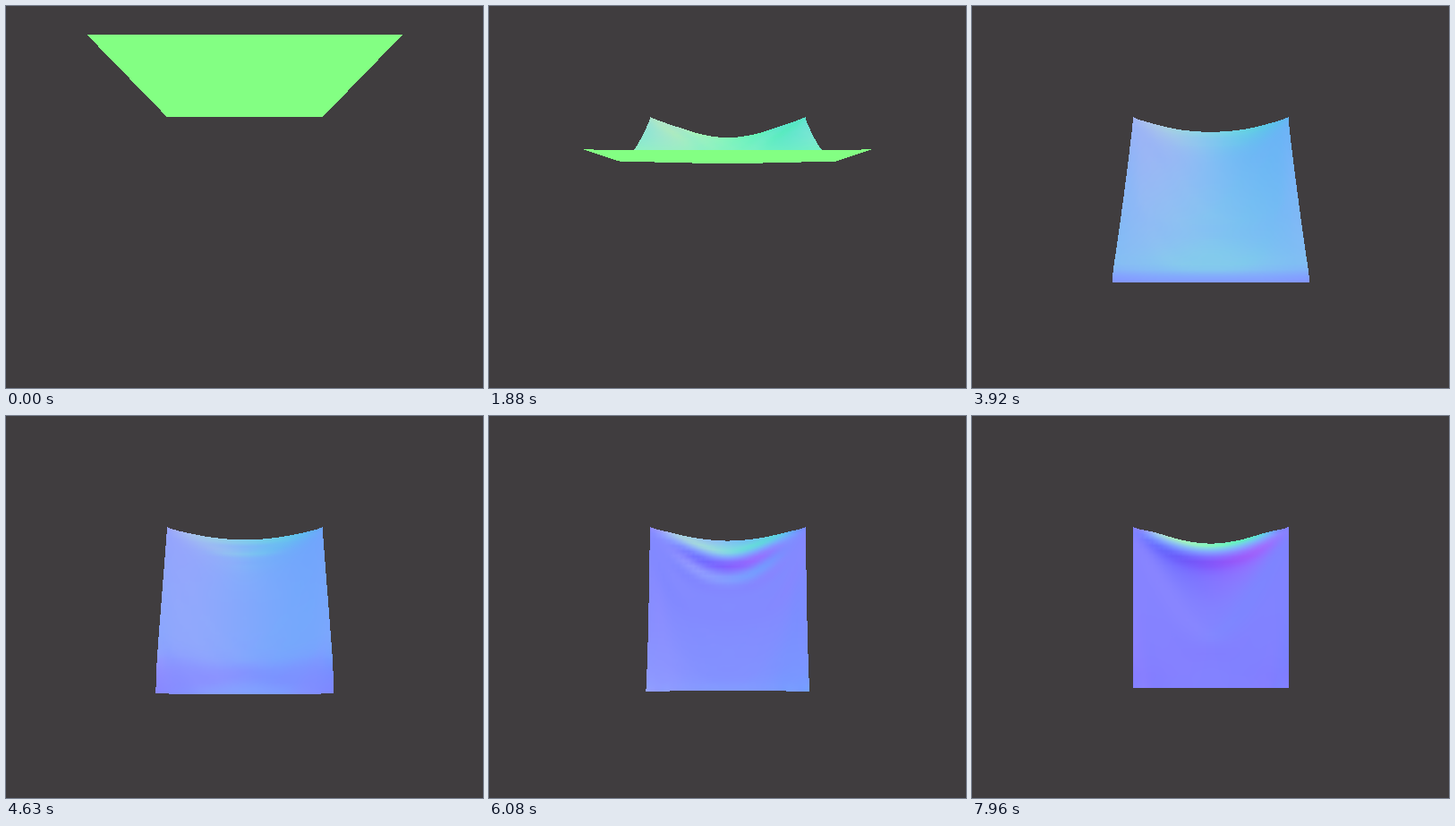
These frames come from a looping animation (533 px wide and 427 px high, 8000 ms). An HTML page with a canvas:

```html
<!DOCTYPE html>
<html lang="en">
<head>
<meta charset="utf-8">
<title>Falling cloth</title>
<style>
  html, body { margin: 0; height: 100%; overflow: hidden; background: #403d3f; }
  canvas { display: block; width: 100vw; height: 100vh; }
</style>
</head>
<body>
<canvas id="stage" width="533" height="427"></canvas>
<script>
const WIDTH = 533, HEIGHT = 427, DURATION = 8000, FPS = 24;
const SIDE = 174, CELLS = 32, N = CELLS + 1, COUNT = N * N, GAP = SIDE / CELLS;
const CAMERA = { x: 266.8, y: 213.5, distance: 343 }, START_HEIGHT = 89.5;
const GRAVITY = 61.8, AIR_DRAG = 1.1, STIFFNESS = 14000, SPRING_DAMPING = 8;
const STEPS = 17, DT = 1 / FPS / STEPS;

// Cloth: x to the right, y up, z towards the camera; row 0 is the far edge.
const position = new Float64Array(COUNT * 3);
const velocity = new Float64Array(COUNT * 3);
const force = new Float64Array(COUNT * 3);
const springs = [];

function connect(dx, dy, factor) {
  for (let j = 0; j + dy < N; j++) {
    for (let i = Math.max(0, -dx); i < N && i + dx < N; i++) {
      springs.push({
        a: (j * N + i) * 3,
        b: ((j + dy) * N + i + dx) * 3,
        rest: Math.hypot(dx, dy) * GAP,
        k: STIFFNESS * factor
      });
    }
  }
}

function buildCloth() {
  for (let j = 0; j < N; j++) {
    for (let i = 0; i < N; i++) {
      position.set([i * GAP - SIDE / 2, START_HEIGHT, j * GAP], (j * N + i) * 3);
    }
  }
  connect(1, 0, 1);
  connect(0, 1, 1);
  connect(1, 1, 0.5);
  connect(-1, 1, 0.5);
  connect(2, 0, 0.05);
  connect(0, 2, 0.05);
}

function step() {
  const p = position, v = velocity, f = force;
  for (let n = 0; n < f.length; n += 3) {
    f[n] = -AIR_DRAG * v[n];
    f[n + 1] = -AIR_DRAG * v[n + 1] - GRAVITY;
    f[n + 2] = -AIR_DRAG * v[n + 2];
  }
  for (const { a, b, rest, k } of springs) {
    const x = p[b] - p[a], y = p[b + 1] - p[a + 1], z = p[b + 2] - p[a + 2];
    const length = Math.sqrt(x * x + y * y + z * z);
    const closing = ((v[b] - v[a]) * x + (v[b + 1] - v[a + 1]) * y +
                     (v[b + 2] - v[a + 2]) * z) / length;
    const pull = (k * (length - rest) + SPRING_DAMPING * closing) / length;
    f[a] += pull * x; f[a + 1] += pull * y; f[a + 2] += pull * z;
    f[b] -= pull * x; f[b + 1] -= pull * y; f[b + 2] -= pull * z;
  }
  // The two far corners are pinned.
  f.fill(0, 0, 3);
  f.fill(0, CELLS * 3, N * 3);
  for (let n = 0; n < p.length; n++) {
    v[n] += f[n] * DT;
    p[n] += v[n] * DT;
  }
}

function simulate() {
  const poses = [];
  buildCloth();
  for (let n = 0; n < DURATION / 1000 * FPS; n++) {
    poses.push(Float32Array.from(position));
    for (let s = 0; s < STEPS; s++) step();
  }
  return poses;
}

const context = document.getElementById("stage").getContext("2d");
const image = context.createImageData(WIDTH, HEIGHT);
const pixels = image.data;
const depth = new Float32Array(WIDTH * HEIGHT);

// Screen place, nearness and the surface normal shown as a colour.
function shadeVertex(pose, i, j) {
  const at = (col, row) => (row * N + col) * 3;
  const difference = (a, b) => [0, 1, 2].map(n => pose[b + n] - pose[a + n]);
  const u = difference(at(Math.max(i - 1, 0), j), at(Math.min(i + 1, CELLS), j));
  const v = difference(at(i, Math.max(j - 1, 0)), at(i, Math.min(j + 1, CELLS)));
  const normal = [
    v[1] * u[2] - v[2] * u[1],
    v[2] * u[0] - v[0] * u[2],
    v[0] * u[1] - v[1] * u[0]
  ];
  const size = Math.hypot(...normal) || 1;
  const n = at(i, j);
  const scale = CAMERA.distance / (CAMERA.distance - pose[n + 2]);
  return {
    x: CAMERA.x + scale * pose[n],
    y: CAMERA.y - scale * pose[n + 1],
    near: scale,
    color: normal.map(c => 131 + 127 * c / size)
  };
}

function fillTriangle(a, b, c) {
  const area = (b.x - a.x) * (c.y - a.y) - (c.x - a.x) * (b.y - a.y);
  if (!area) return;
  const left = Math.max(0, Math.floor(Math.min(a.x, b.x, c.x)));
  const right = Math.min(WIDTH - 1, Math.ceil(Math.max(a.x, b.x, c.x)));
  const top = Math.max(0, Math.floor(Math.min(a.y, b.y, c.y)));
  const bottom = Math.min(HEIGHT - 1, Math.ceil(Math.max(a.y, b.y, c.y)));
  for (let row = top; row <= bottom; row++) {
    for (let col = left; col <= right; col++) {
      const x = col + 0.5 - a.x, y = row + 0.5 - a.y;
      const wb = (x * (c.y - a.y) - (c.x - a.x) * y) / area;
      const wc = ((b.x - a.x) * y - x * (b.y - a.y)) / area;
      const wa = 1 - wb - wc;
      if (wa < 0 || wb < 0 || wc < 0) continue;
      const near = wa * a.near + wb * b.near + wc * c.near;
      const spot = row * WIDTH + col;
      if (near < depth[spot]) continue;
      depth[spot] = near;
      for (let n = 0; n < 3; n++) {
        pixels[spot * 4 + n] = wa * a.color[n] + wb * b.color[n] + wc * c.color[n];
      }
    }
  }
}

function draw(pose) {
  new Uint32Array(pixels.buffer).fill(0xff3f3d40);
  depth.fill(0);
  const vertices = [];
  for (let j = 0; j < N; j++) {
    for (let i = 0; i < N; i++) vertices.push(shadeVertex(pose, i, j));
  }
  for (let j = 0; j < CELLS; j++) {
    for (let i = 0; i < CELLS; i++) {
      const n = j * N + i;
      fillTriangle(vertices[n], vertices[n + 1], vertices[n + N]);
      fillTriangle(vertices[n + 1], vertices[n + N + 1], vertices[n + N]);
    }
  }
  context.putImageData(image, 0, 0);
}

const poses = simulate();
let shown = -1;

function play() {
  const index = Math.floor(performance.now() % DURATION * FPS / 1000);
  if (index !== shown) draw(poses[shown = index]);
  requestAnimationFrame(play);
}
play();
</script>
</body>
</html>
```
